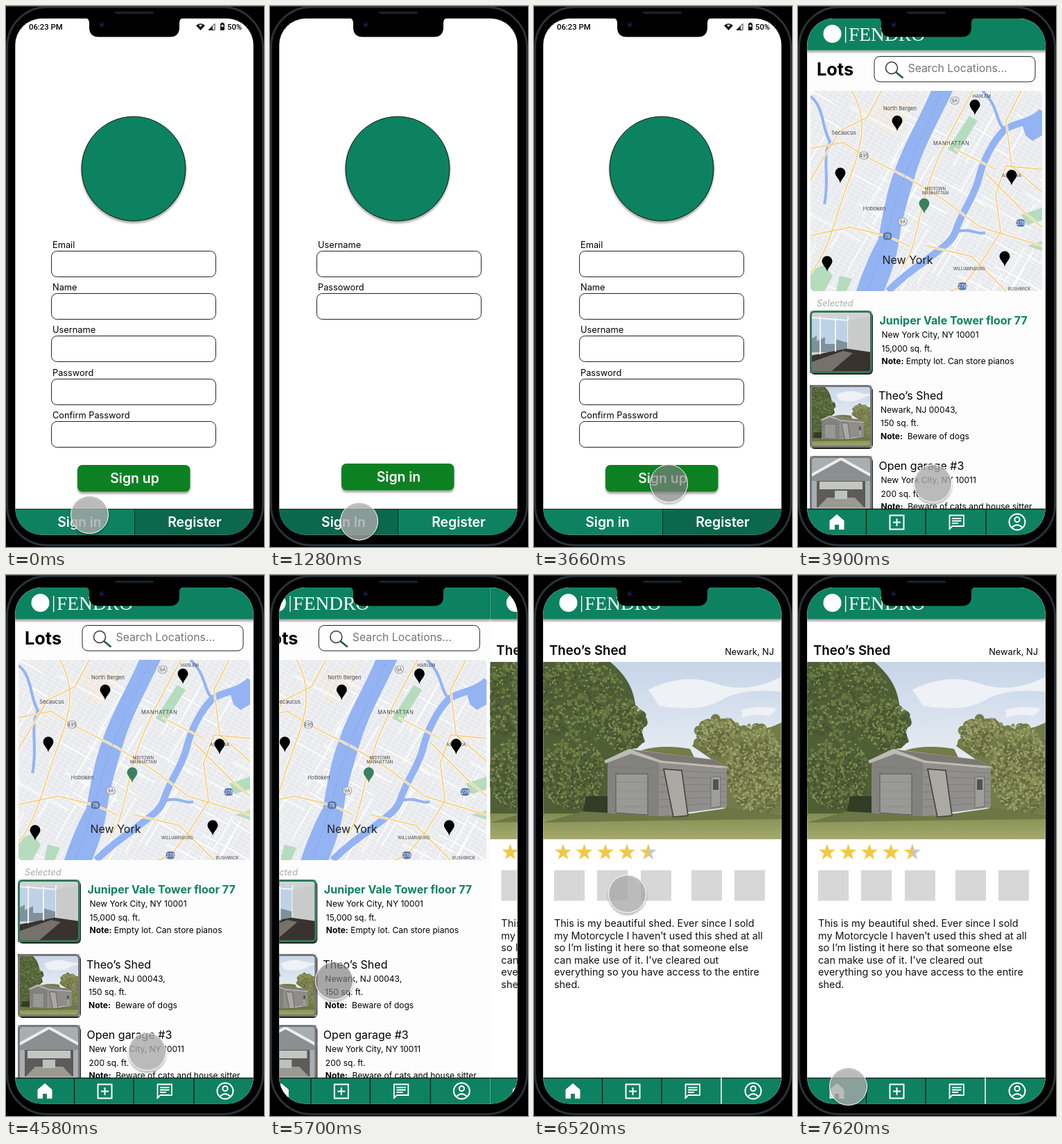
An HTML page for the animation above (7990 ms loop, 372 by 778 pixels).

```html
<!DOCTYPE html>
<html lang="en">
<head>
<meta charset="utf-8">
<title>Storage app walkthrough</title>
<style>
  html, body { margin: 0; width: 100%; height: 100%; overflow: hidden; background: #000; }
  svg { display: block; }
  #stage { width: 372px; height: 778px; font-family: Inter, sans-serif; }
  .mid { text-anchor: middle; }
  .status { font-family: Roboto, sans-serif; font-weight: 500; }
</style>
</head>
<body>
<svg id="stage" viewBox="0 0 372 778"></svg>
<script>
const LOOP = 7990, PAGE = 344;
const GREEN = '#0e8260', DARK = '#0c684c', BUTTON = '#0c8122';

let seed = 7;
const random = () => (seed = seed * 16807 % 2147483647) / 2147483647;
const text = (x, y, size, str, more = '') => `<text x="${x}" y="${y}" font-size="${size}" ${more}>${str}</text>`;
const rect = (x, y, w, h, fill, more = '') => `<rect x="${x}" y="${y}" width="${w}" height="${h}" fill="${fill}" ${more}/>`;
const shape = (d, fill, more = '') => `<path d="${d}" fill="${fill}" ${more}/>`;
const line = (d, color, width, more = '') => shape(d, 'none', `stroke="${color}" stroke-width="${width}" ${more}`);
const circle = (x, y, r, fill, more = '') => `<circle cx="${x}" cy="${y}" r="${r}" fill="${fill}" ${more}/>`;

// ---------- sign in and register ----------
const field = (label, x, y) => text(x + 2, y - 4, 12.8, label) +
  rect(x + .5, y + .5, 237, 37, '#fff', 'rx="8" stroke="#222"');

const button = (label, y) => rect(103, y, 162.5, 38.5, BUTTON, 'rx="7" filter="url(#drop)"') +
  text(185.5, y + 25.5, 19.4, label, 'class="mid" fill="#fff" font-weight="600"');

const emblem = circle(184, 234, 75, GREEN, 'stroke="#111" filter="url(#drop)"');

function tabs(left, split, leftLabel, rightLabel) {
  const caption = (x, s) => text(x, 749, 19.4, s, 'class="mid" fill="#fff" font-weight="600"');
  return rect(13, 723, split - 13, 38, left ? DARK : GREEN) + rect(split, 723, 358 - split, 38, left ? GREEN : DARK) +
    line(`M13 723.5H357M${split + .5} 723V761`, '#0b2a20', 1) + caption(106, leftLabel) + caption(272, rightLabel);
}

const statusBar = text(33, 34, 11.3, '06:23 PM', 'class="status"') + text(319, 34, 11.3, '50%', 'class="status"') +
  shape('M274 28Q280.500 22.500 287 28L280.500 35Z', '#111') + shape('M278 27.500Q280.500 26 283 27.500L280.500 30Z', '#fff') +
  line('M292 34.500L301 25.500V34.500Z', '#333', 1) + shape('M292 34.500L298 28.500V34.500Z', '#222') +
  rect(309, 25, 6, 10, '#111', 'rx="1"') + rect(310.5, 23.8, 3, 2, '#111') + rect(310.5, 27, 3, 3, '#fff');

const register = statusBar + emblem +
  ['Email', 'Name', 'Username', 'Password', 'Confirm Password']
    .map((label, i) => field(label, 65, Math.round(352 + i * 61.2))).join('') +
  button('Sign up', 660) + tabs(false, 185, 'Sign in', 'Register');

const signIn = emblem + field('Username', 67, 352) + field('Passoword', 67, 413) +
  button('Sign in', 658) + tabs(true, 184, 'Sign In', 'Register');

// ---------- shared app chrome ----------
const header = rect(13, 18, PAGE, 45.5, GREEN, 'filter="url(#drop)"') + circle(49.5, 40, 13, '#fff') +
  rect(68, 30, 1.3, 23, '#fff') +
  text(73, 50, 27.5, 'FENDRO', 'fill="#fff" font-family="Liberation Serif, serif"');

const navBar = lastSplit => rect(13, 723, PAGE, 38, GREEN) +
  line('M13 723.500H357M98.500 723V761M184 723V761', '#06281d', 1.5) + lastSplit +
  shape('M56 731L45.500 740V753H53V746H59V753H66.500V740Z', '#fff') +
  line('M132.500 732.500H152.500V752.500H132.500ZM142.500 737V748M137 742.500H148', '#fff', 2) +
  line('M218.500 752V732.500H239V748H222.500ZM222 737H235.500M222 740.500H235.500M222 744H231', '#fff', 1.8) +
  circle(316, 742, 11.5, 'none', 'stroke="#fff" stroke-width="2"') +
  circle(316, 738.5, 3.6, 'none', 'stroke="#fff" stroke-width="2"') +
  line('M308.500 750Q316 742.500 323.500 750', '#fff', 2);

// ---------- map ----------
function streets() {
  let d = '';
  for (let i = 0; i < 60; i++) {
    const x = 18 + random() * 334, y = 122 + random() * 288, a = random() < .5 ? .5 : 2.1;
    const len = 30 + random() * 70, dx = Math.cos(a) * len, dy = Math.sin(a) * len;
    d += `M${x} ${y}q${dx / 2} ${dy / 2 + random() * 14 - 7} ${dx} ${dy}`;
  }
  return line(d, '#fff', 1.6);
}

const pin = (x, y, color = '#000') =>
  shape(`M${x} ${y + 14}C${x - 1} ${y + 8} ${x - 7.5} ${y + 4} ${x - 7.5} ${y - 1}a7.500 7.500 0 0 1 15 0C${x + 7.5} ${y + 4} ${x + 1} ${y + 8} ${x} ${y + 14}Z`, color);

const shield = (x, y, s, blue) => rect(x - 6, y - 5, 12, 10, blue ? '#5577b5' : '#fff', 'rx="4" stroke="#667" stroke-width=".7"') +
  text(x, y + 2.6, 7, s, `class="mid" fill="${blue ? '#fff' : '#444'}"`);

const place = (x, y, size, s, more = '') => text(x, y, size, s, `class="mid" fill="#444" ${more}`);

const highways = 'M18 205L65 196L95 215L160 248L215 282L262 318L352 345M78 122C105 170 88 210 70 260S45 350 18 385' +
  'M252 122C230 165 195 220 180 285S165 355 150 375M352 235L300 230L285 270L292 325L262 372L237 403L220 410' +
  'M18 330L75 318L129 331L160 345M322 122L300 165L308 230L352 268M270 240L330 300L352 318' +
  'M120 122L100 160L60 180L18 250M185 345L250 360L300 410M225 205L285 235';

const map = `<g clip-path="url(#mapClip)">` + rect(18, 122, 334, 288, '#e8eaed') +
  shape('M110 145L168 130L150 178L118 188Z', '#f0e8df') + rect(18, 122, 334, 288, 'url(#grid)') + streets() +
  shape('M247 158L259 165L229 213L216 206ZM18 380L38 372L50 388L38 410H18ZM60 388L78 392L70 410H55ZM322 300L352 290V308L330 315ZM330 345L352 338V352Z', '#b5dcbd') +
  shape('M192 122H223C210 152 184 195 170 240C158 280 149 310 146 335C142 365 132 390 124 410H84C92 385 104 356 116 335C122 300 128 265 140 235C154 195 176 160 192 122Z', '#93b3f3') +
  line('M352 152C335 168 312 168 298 178C280 195 266 225 260 250C253 277 234 300 228 322C222 342 200 352 186 365C168 377 148 392 130 410', '#93b3f3', 10) +
  line('M298 178C284 165 290 145 266 122M18 130C38 145 34 175 46 195C34 215 46 250 38 285M228 325C250 318 258 330 270 326', '#93b3f3', 4) +
  shape('M322 166L352 150V186L338 194L328 186Z', '#93b3f3') +
  line(highways, '#fff', 3.4) + line(highways, '#f5d081', 1.9) +
  line('M208 122C185 180 155 230 140 285S122 350 100 410', '#7f9bd6', .7, 'stroke-dasharray="4 2"') +
  place(265, 132, 6.3, 'HARLEM') + place(147, 150, 7.6, 'North Bergen') + place(66, 185, 7.6, 'Secaucus') +
  place(221, 200, 7.5, 'MANHATTAN', 'letter-spacing=".5"') + place(198, 265, 6, 'MIDTOWN') + place(198, 271, 6, 'MANHATTAN') +
  place(110, 294, 7.6, 'Hoboken') + place(247, 380, 6, 'WILLIAMSBURG') + place(319, 409, 6, 'BUSHWICK') +
  place(308, 246, 6.5, 'ASTORIA') + text(158, 371, 16, 'New York', 'class="mid" fill="#222"') +
  shield(95, 215, '495') + shield(226, 136, '9A') + shield(151, 310, '9A') +
  shield(129, 331, '78', 1) + shield(321, 312, '278', 1) + shield(237, 403, '278', 1) +
  [[143, 166], [255, 143], [61, 241], [308, 244], [42, 368], [298, 361]].map(p => pin(...p)).join('') +
  pin(182, 285, '#3c8064') + '</g>';

// ---------- pictures ----------
function leaves(cx, cy, rx, ry, count, color, size) {
  let d = '';
  for (let i = 0; i < count; i++) {
    const a = random() * 2 * Math.PI, r = Math.sqrt(random());
    d += `M${(cx + Math.cos(a) * r * rx).toFixed(1)} ${(cy + Math.sin(a) * r * ry).toFixed(1)}h.1`;
  }
  return line(d, color, size, 'stroke-linecap="round"');
}

const SHADY = ['#4f5f35', '#66763f', '#455330', '#87935a'];
const SUNNY = ['#737b49', '#8a9059', '#626a3f', '#a6a974'];

const bush = (cx, cy, rx, ry, n, [base, mid, dark, light]) => leaves(cx, cy, rx, ry, n, base, 14) +
  leaves(cx, cy, rx, ry, n * 2, mid, 5) + leaves(cx, cy + ry * .15, rx, ry * .85, n * 2, dark, 4) +
  leaves(cx, cy, rx, ry, n * 2, light, 2.5);

const shed = rect(13, 125, 344, 255, 'url(#sky)') +
  shape('M165 165Q215 140 262 156T357 146V168Q300 162 270 180T180 188ZM300 194Q325 186 350 192L340 203Q320 198 300 206Z', '#eef1f5') +
  shape('M155 252Q185 243 225 250L235 270H155Z', SUNNY[0]) +
  shape('M13 125H110Q140 150 145 180T160 240L120 262L105 348H13Z', SHADY[0]) +
  shape('M228 246Q250 205 284 206Q310 236 357 212V345H275V278Z', SUNNY[0]) +
  bush(62, 180, 70, 62, 110, SHADY) + bush(128, 215, 30, 38, 50, SHADY) + bush(55, 285, 46, 52, 80, SHADY) +
  bush(268, 232, 34, 28, 50, SUNNY) + bush(320, 280, 42, 66, 120, SUNNY) +
  shape('M75 318H106V345L70 343Z', '#333c27') + rect(13, 343, 344, 37, 'url(#grass)') +
  shape('M13 356L70 340L200 347L280 335L357 345V351L190 353Z', '#6c7745') +
  shape('M106 267L140 254L180 269V347L106 342Z', '#82827f') + shape('M180 269L278 278V334L180 347Z', '#908f8c') +
  line('M106 276L180 278M180 280L278 285M180 290L278 293M180 301L278 302M180 312L278 311M180 323L278 319M180 334L278 327', '#797976', .8) +
  shape('M101 267L137 250L262 266L281 278L182 270L140 257L103 271Z', '#bdbbb3') + shape('M140 251L262 266L276 275L184 267Z', '#7c7974') +
  shape('M118 286H164V345L118 342Z', '#999996', 'stroke="#545552"') + line('M118 298H164M118 310H164M118 322H164M118 333H164', '#878784', .8) +
  shape('M187 279L213 281L222 346L201 348Z', '#aaa9a4', 'stroke="#3d3d3a" stroke-width="1.5"') +
  shape('M255 290H269V333L255 335Z', '#9e9e9a', 'stroke="#6d6d6a"') + rect(258, 294, 8, 15, '#50534f');

const room = shape('M0 0H90V90H0Z', '#d0d3d4') + rect(0, 10, 54, 50, '#bdd2e6') +
  shape('M0 42L10 36V44L22 38V48H36V41L54 46V60H0Z', '#7f929b') + shape('M0 65L57 54L90 59V90H0Z', '#39322e') +
  shape('M0 75L48 58L62 61L28 90H0Z', '#77716c') + line('M15 8V63M37 10V59M55 8V55M0 10L55 14', '#f4f5f5', 2) + shape('M55 14L90 8V60L55 55Z', '#c9cbcb');

const garage = shape('M0 0H90V90H0Z', '#a8afb3') + shape('M0 28L45 2L90 28V36H0Z', '#8c8f91') + line('M0 29L45 4L90 29', '#eceded', 4) +
  rect(10, 36, 70, 40, '#5d5c58') + rect(14, 37, 62, 11, '#c4c6c4') + shape('M10 76L25 60H65L80 76Z', '#9b9992') +
  rect(36, 50, 18, 12, '#b9c2bd') + rect(0, 74, 90, 16, '#b4b4b0');

function thumb(y, content, border) {
  return rect(18, y + 2, 90, 90, '#222', 'rx="6"') + `<svg x="17" y="${y}" width="90" height="90">${content}</svg>` +
    rect(18.5, y + 1.5, 87, 87, 'none', `rx="5" stroke="${border}" stroke-width="3"`);
}

// ---------- home and detail ----------
function lot(x, y, title, titleStyle, lines, note) {
  return text(x - 3, y, 16, title, titleStyle) + lines.map((s, i) => text(x, y + 19 + i * 19.5, 12, s)).join('') +
    text(x, y + 57.3, 12, `<tspan font-weight="700">Note:</tspan> ${note}`);
}

const home = rect(13, 18, PAGE, 742, '#fdfdfd') + header + text(27, 100, 25.3, 'Lots', 'font-weight="700"') +
  rect(110, 72.5, 232, 36.5, '#fff', 'rx="8" stroke="#222"') +
  circle(135, 89, 8.5, 'none', 'stroke="#333" stroke-width="1.5"') + line('M141 95L151.500 103.500', '#1d5c45', 2.6) +
  text(158.5, 95, 15.8, 'Search Locations...', 'fill="#757575"') + map +
  text(27, 432, 12.8, 'Selected', 'fill="#aaa" font-style="italic"') +
  thumb(438, room, '#34795c') + thumb(545, '<use href="#shed" width="90" height="90"/>', '#777') + thumb(647, garage, '#777') +
  lot(120.5, 458, 'Juniper Vale Tower floor 77', `fill="${GREEN}" font-weight="700"`, ['New York City, NY 10001', '15,000 sq. ft.'], 'Empty lot. Can store pianos') +
  lot(119, 565.5, 'Theo’s Shed', '', ['Newark, NJ 00043,', '150 sq. ft.'], '&#160;Beware of dogs') +
  lot(119.5, 667, 'Open garage #3', '', ['New York City, NY 10011', '200 sq. ft.'], '&#160;Beware of cats and house sitter') +
  navBar(line('M271 723V761', '#06281d', 1.5));

function star(cx, color, more = '') {
  const points = Array.from({ length: 10 }, (_, i) => {
    const r = i % 2 ? 4.9 : 12.5, a = i * Math.PI / 5;
    return `${(cx + r * Math.sin(a)).toFixed(1)} ${(399 - r * Math.cos(a)).toFixed(1)}`;
  });
  return shape(`M${points.join('L')}Z`, color, more);
}

const story = ['This is my beautiful shed. Ever since I sold', 'my Motorcycle I haven’t used this shed at all',
  'so I’m listing it here so that someone else', 'can make use of it. I’ve cleared out',
  'everything so you have access to the entire', 'shed.'];

const detail = rect(13, 18, PAGE, 742, '#fff') + header + text(22, 115, 18.7, 'Theo’s Shed', 'font-weight="600"') +
  text(346, 115, 12.8, 'Newark, NJ', 'text-anchor="end"') + '<use href="#shed" x="13" y="125" width="344" height="255"/>' +
  [42, 72.5, 103, 134].map(x => star(x, '#f3c746')).join('') + star(165, '#c3c8d0') + star(165, '#f3c746', 'clip-path="url(#half)"') +
  [29, 91, 154, 227, 289].map(x => rect(x, 424.5, 44, 44, '#d7d7d7')).join('') +
  story.map((s, i) => text(29, 506 + i * 17.6, 14.4, s, 'fill="#111"')).join('') +
  navBar(line('M270 723V761', '#fff', 1.5));

// ---------- stage ----------
const stage = document.getElementById('stage');
stage.innerHTML = `<defs>
  <filter id="drop" x="-20%" y="-20%" width="140%" height="150%"><feDropShadow dx="0" dy="3" stdDeviation="1.6" flood-opacity=".35"/></filter>
  <clipPath id="screen"><rect x="13.300" y="18" width="343.400" height="742.500" rx="38"/></clipPath>
  <clipPath id="mapClip"><rect x="18" y="122" width="334" height="288.500" rx="6"/></clipPath>
  <clipPath id="half"><rect x="150" y="380" width="15.500" height="35"/></clipPath>
  <pattern id="grid" width="9" height="6" patternUnits="userSpaceOnUse" patternTransform="rotate(30)"><path d="M0 0H9M0 0V6" stroke="#f8f9fa" stroke-width="1.600"/></pattern>
  <linearGradient id="sky" x2="0" y2="1"><stop stop-color="#c6d5e9"/><stop offset=".5" stop-color="#e4eaf1"/></linearGradient>
  <linearGradient id="grass" x2="0" y2="1"><stop stop-color="#828d52"/><stop offset="1" stop-color="#a5aa6e"/></linearGradient>
  <symbol id="shed" viewBox="13 125 344 255" preserveAspectRatio="xMidYMid slice">${shed}</symbol>
</defs>` +
  rect(0, 0, 372, 778, '#000') + rect(1.5, 1.5, 369, 774, '#000', 'rx="58" stroke="#2a3237" stroke-width="3"') +
  rect(0, 0, 372, 1, '#4a4a4a') + rect(157, 8, 56, 3.5, '#1d1f21', 'rx="1.700"') +
  `<g clip-path="url(#screen)">${rect(13, 18, PAGE, 743, '#fff')}
    <g id="register">${register}</g><g id="signIn">${signIn}</g>
    <g id="app">${home}<g transform="translate(${PAGE})">${detail}</g></g></g>` +
  shape('M114 17.500q6 0 6 7v6q0 14 14 14h102q14 0 14-14v-6q0-7 6-7z', '#000') +
  circle(138, 27, 4, '#0b0d1c') + circle(138, 27, 1.6, '#22296b') +
  `<g id="cursor">${circle(0, 0, 27, '#b0b0b0', 'stroke="#fff" filter="url(#drop)"')}</g>`;

const poses = [
  [0, 120.5, 731.5], [120, 120.5, 736], [240, 120.5, 739.5], [1130, 120.5, 740.5], [1280, 128.5, 741],
  [1430, 179.5, 741], [1580, 236, 742], [1700, 263.5, 743.5], [2990, 240, 724], [3110, 198.5, 690],
  [3260, 194.5, 686.5], [4020, 197, 688], [4140, 199.5, 690], [4580, 203.5, 685.5], [4730, 200.5, 683],
  [4850, 197.5, 680.5], [5310, 140, 626], [5430, 92.5, 583.5], [5580, 92.5, 583.5], [5700, 92.5, 583.5],
  [5850, 100, 585], [5970, 112, 587], [6120, 119.5, 588], [6370, 117.5, 586.5], [6520, 134.5, 458.5],
  [6670, 131, 410], [6790, 145.5, 370.5], [7040, 144.5, 478.5], [7200, 99.5, 670.5], [7350, 85.5, 725.5],
  [7500, 76, 732], [7620, 72.5, 735.5]
];
const presses = [[610, 730], [2630, 2750], [3660, 3780], [5580, 5850]];
const easeInOut = u => u < .5 ? 2 * u * u : 1 - 2 * (1 - u) ** 2;

const [registerView, signInView, appView, cursor] = ['register', 'signIn', 'app', 'cursor'].map(id => document.getElementById(id));
const disc = cursor.firstChild;

function draw(now) {
  const t = now % LOOP;
  const [held, x, y] = poses.findLast(p => p[0] <= t);
  const view = t >= 3900 ? appView : t >= 880 && t < 2870 ? signInView : registerView;
  for (const v of [registerView, signInView, appView]) v.style.display = v === view ? '' : 'none';

  const slide = easeInOut(Math.min(1, Math.max(0, (held - 5580) / 500)));
  appView.setAttribute('transform', `translate(${-PAGE * slide})`);

  const pressed = presses.some(([from, to]) => t >= from && t < to);
  cursor.setAttribute('transform', `translate(${x} ${y})`);
  disc.setAttribute('fill', pressed ? '#888' : '#b0b0b0');
  disc.setAttribute('fill-opacity', pressed ? .6 : .72);
}

const start = performance.now();
function tick() {
  draw(Math.max(0, performance.now() - start));
  requestAnimationFrame(tick);
}
tick();
</script>
</body>
</html>
```
